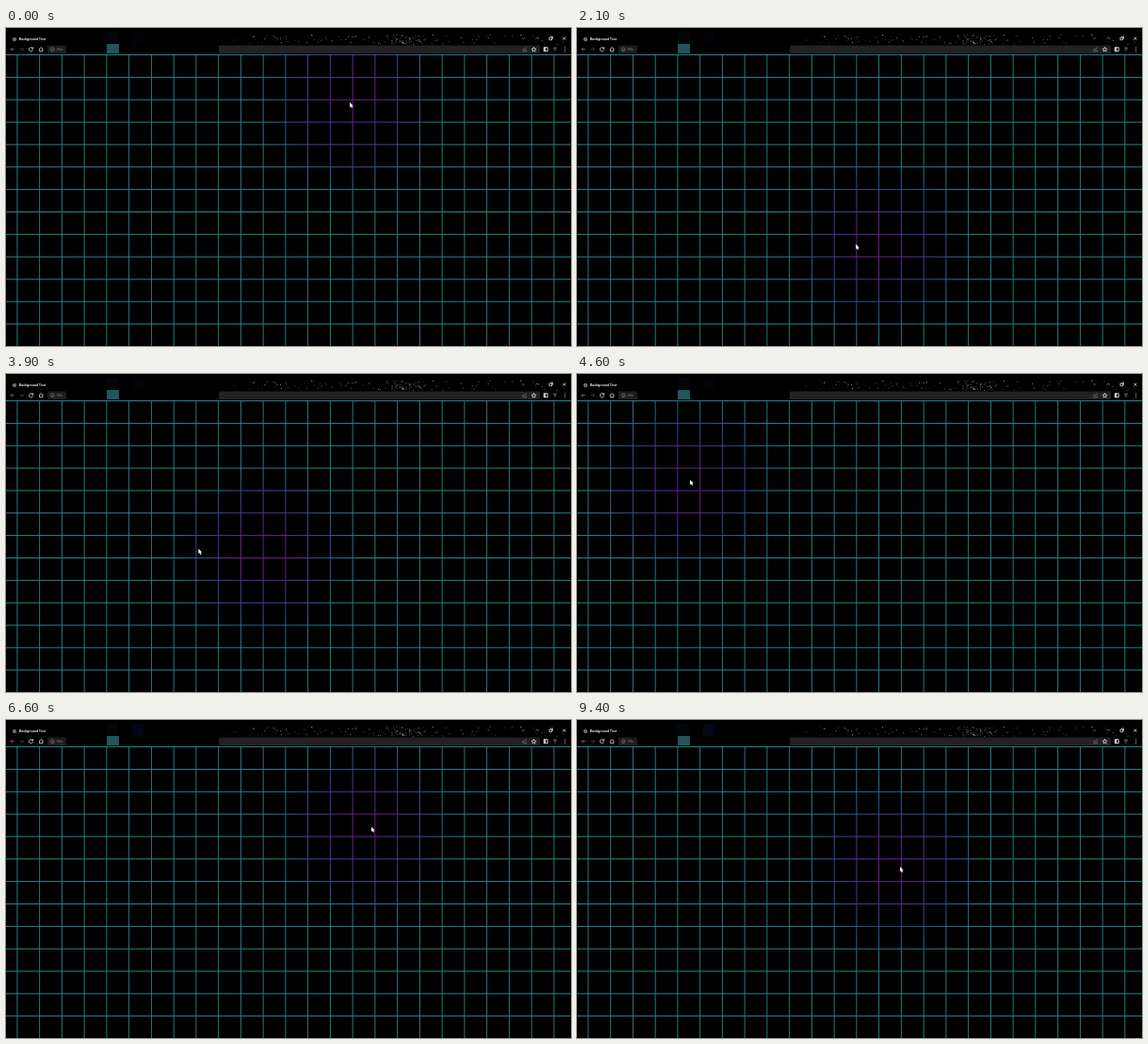
Write an HTML page with a canvas that moves like this. It is 600 by 338 pixels and loops after 9500 ms.

```html
<!DOCTYPE html>
<html lang="en">
<head>
<meta charset="utf-8">
<title>Background Test</title>
<style>
  html, body { margin: 0; width: 100%; height: 100%; overflow: hidden; background: #000; }
  canvas, svg { position: absolute; left: 0; top: 0; width: 600px; height: 338px; }
  text { font-family: Roboto, sans-serif; font-size: 3.8px; font-weight: 500; }
  .line { fill: none; stroke: #ddd; stroke-width: .8; }
  .dim { stroke: #777; }
</style>
</head>
<body>
<canvas id="grid" width="600" height="338"></canvas>
<svg viewBox="0 0 600 338">
  <rect x="107" y="4" width="12" height="12" fill="#01060a"/>
  <rect id="navy" x="134" y="4" width="12" height="13"/>
  <g id="stars"></g>

  <circle cx="9" cy="12" r="1.8" fill="#666" stroke="#aaa" stroke-width=".5"/>
  <text x="13.7" y="13.3" fill="#fff">Background Test</text>
  <g class="line">
    <path class="dim" d="M547.8 10.2l1.7 1.6 1.7-1.6M562.4 11.6l1.7-1.6 1.7 1.6"/>
    <path d="M577 10.2h2.5v2.5h-2.5zM578 9.2h2.5v2.5M591.3 9.7l3 3m0-3l-3 3"/>
  </g>

  <rect x="44" y="18.5" width="20" height="8.5" rx="1" fill="#1d1d1f"/>
  <rect x="107" y="17" width="13" height="10" fill="#20565b"/>
  <rect x="226" y="18.4" width="341" height="8.6" rx="1" fill="#232124"/>
  <g class="line">
    <path class="dim" d="M9 22.7H5m1.7-1.8L4.9 22.7l1.8 1.8"/>
    <path d="M14.5 22.7h4m-1.7-1.8l1.8 1.8-1.8 1.8" stroke="#444" style="stroke:#444"/>
    <path d="M28.5 21.7a2.1 2.1 0 1 0 .2 1.6M28.8 20.2v1.8h-1.8"/>
    <path d="M34.9 22.6l2.3-2 2.3 2M35.6 22.2v2.6h3.2v-2.6"/>
    <circle class="dim" cx="49.3" cy="22.7" r="1.9"/>
    <path class="dim" d="M49.3 22.4v1.3M549 22v2.7h3.4V23M550.3 23q.3-2 2.4-2"/>
    <path d="M560.5 20.4l.7 1.6 1.7.2-1.3 1.1.4 1.7-1.5-.9-1.5.9.4-1.7-1.3-1.1 1.7-.2z"/>
    <path d="M571.2 20.7h4v4h-4zM572 20.7v4M572.7 20.7v4" style="stroke:#fff"/>
    <path class="dim" d="M581.3 21h3.4l-1.7 2zM583 23v2"/>
    <path d="M593.6 20.4v5" stroke-dasharray="1"/>
  </g>
  <text x="54.2" y="24.1" fill="#777">File</text>

  <path id="cursor" d="M0 0v5.2l1.1-1 .9 1.9 1.1-.5-.9-1.8h1.6z" fill="#fff"/>
</svg>
<script>
const LOOP = 9500, STEP = 100, CELL_W = 23.75, CELL_H = 23.85, RADIUS = 105;
const $ = id => document.getElementById(id);
const ctx = $('grid').getContext('2d');

// where the pointer comes to rest
const stops = [
  { t: 0, x: 365, y: 79 },
  { t: 1100, x: 234, y: 195 },
  { t: 3100, x: 358, y: 154.5 },
  { t: 4600, x: 120, y: 112.5 },
  { t: 6600, x: 388, y: 113.5 },
  { t: 7700, x: 339, y: 172 },
  { t: 9400, x: 343, y: 156 }
];

// ease from stop to stop, swinging to both sides on the way
function pointer(t) {
  t = Math.min(Math.max(t, 0), stops.at(-1).t);
  const next = Math.max(1, stops.findIndex(s => s.t >= t));
  const a = stops[next - 1], b = stops[next];
  const u = (t - a.t) / (b.t - a.t), ease = u * u * (3 - 2 * u);
  const arc = Math.sin(Math.PI * u);
  return {
    x: a.x + (b.x - a.x) * ease + 110 * arc * Math.sin(2 * Math.PI * u),
    y: a.y + (b.y - a.y) * ease + 55 * arc * arc
  };
}

function drawGrid() {
  ctx.globalCompositeOperation = 'source-over';
  ctx.clearRect(0, 0, 600, 338);
  ctx.fillStyle = 'rgb(42,132,134)';
  for (let x = 11.45; x < 600; x += CELL_W) ctx.fillRect(x, 28, .9, 310);
  ctx.fillStyle = 'rgb(36,142,142)';
  for (let y = 28.05; y < 338; y += CELL_H) ctx.fillRect(0, y, 600, .95);
}

function drawGlow({ x, y }) {
  const g = ctx.createRadialGradient(x, y, 0, x, y, RADIUS);
  g.addColorStop(0, 'rgba(125,20,150,.95)');
  g.addColorStop(.35, 'rgba(98,40,150,.9)');
  g.addColorStop(.65, 'rgba(58,66,160,.75)');
  g.addColorStop(1, 'rgba(35,120,150,0)');
  ctx.globalCompositeOperation = 'source-atop';
  ctx.fillStyle = g;
  ctx.fillRect(x - RADIUS, y - RADIUS, 2 * RADIUS, 2 * RADIUS);
}

// an even scatter, with every third star drawn into a dense cluster
function addStars() {
  let seed = 11, out = '';
  const rnd = () => (seed = seed * 16807 % 2147483647) / 2147483647;
  for (let i = 0; i < 190; i++) {
    const x = i % 3 ? 232 + 360 * rnd() : 422 + 28 * (rnd() + rnd() - 1);
    const y = 7 + 10 * rnd(), size = .5 + .4 * rnd();
    const tint = x < 262 ? '#655c9c' : '#ddd';
    out += `<rect x="${x}" y="${y}" width="${size}" height="${size}" fill="${tint}" opacity="${.25 + .7 * rnd()}"/>`;
  }
  $('stars').innerHTML = out;
}

function frame() {
  const t = Math.floor(performance.now() % LOOP / STEP) * STEP;
  const { x, y } = pointer(t);
  drawGrid();
  drawGlow(pointer(t - STEP)); // the glow trails by one step
  $('cursor').setAttribute('transform', `translate(${x} ${y})`);
  $('navy').setAttribute('fill', t < 6100 ? '#020208' : '#050518');
  requestAnimationFrame(frame);
}

addStars();
frame();
</script>
</body>
</html>
```
